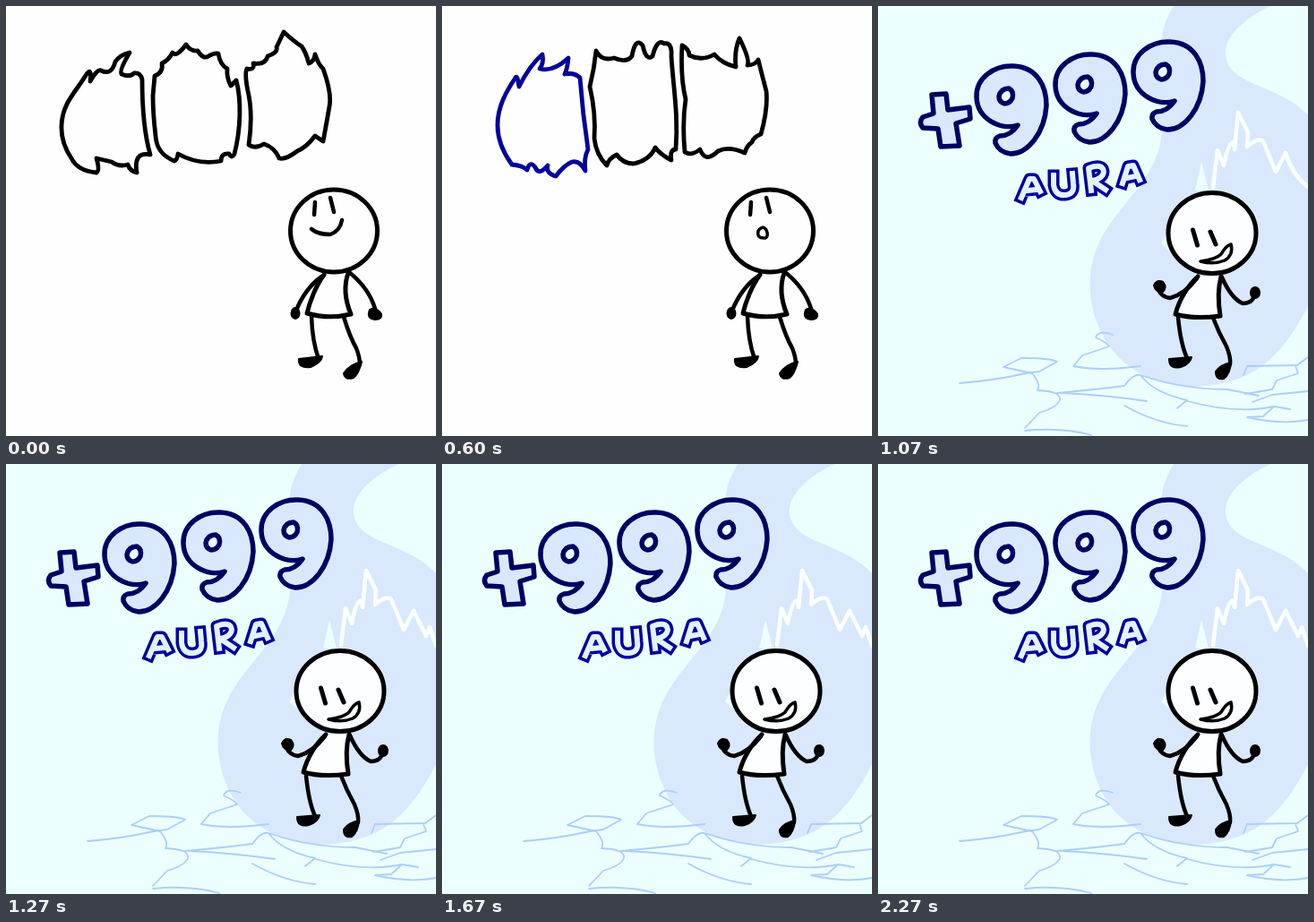
Recreate the animation shown at these times as an HTML page without scripts. Size 480 px wide and 480 px high, loop 2.34 s.

```html
<!DOCTYPE html>
<html lang="en">
<head>
<meta charset="utf-8">
<title>Plus 999 aura</title>
<style>
  html, body { margin: 0; width: 100%; height: 100%; overflow: hidden; background: #fefefe; }
  svg { display: block; width: 100vw; height: 100vh; stroke-linecap: round; stroke-linejoin: round; }

  /* Every scene is a hard cut on one shared 2340 ms loop. */
  .cut { opacity: 0; animation: 2340ms step-end infinite; }
  .intro { animation-name: intro; }
  .smile { animation-name: smile; }
  .gasp { animation-name: gasp; }
  .spin-a { animation-name: spin-a; }
  .spin-b { animation-name: spin-b; }
  .spin-c { animation-name: spin-c; }
  .stop-1 { animation-name: stop-1; }
  .stop-2 { animation-name: stop-2; }
  .stop-3 { animation-name: stop-3; }
  .flash { animation-name: flash; }
  .finale { animation-name: finale; }
  .bolt-a { animation-name: bolt-a; }
  .bolt-b { animation-name: bolt-b; }
  @keyframes intro { 0% { opacity: 1 } 34.187%, 100% { opacity: 0 } }
  @keyframes smile { 0% { opacity: 1 } 22.649%, 100% { opacity: 0 } }
  @keyframes gasp { 0% { opacity: 0 } 22.649%, 100% { opacity: 1 } }
  @keyframes spin-a { 0%, 8.547%, 17.094% { opacity: 1 } 2.991%, 11.538%, 20.085%, 100% { opacity: 0 } }
  @keyframes spin-b { 0%, 5.555%, 14.102%, 22.649%, 100% { opacity: 0 } 2.991%, 11.538%, 20.085% { opacity: 1 } }
  @keyframes spin-c { 0%, 8.547%, 17.094%, 22.649%, 100% { opacity: 0 } 5.555%, 14.102% { opacity: 1 } }
  @keyframes stop-1 { 0%, 28.632%, 100% { opacity: 0 } 22.649% { opacity: 1 } }
  @keyframes stop-2 { 0%, 31.196%, 100% { opacity: 0 } 28.632% { opacity: 1 } }
  @keyframes stop-3 { 0%, 34.187%, 100% { opacity: 0 } 31.196% { opacity: 1 } }
  @keyframes flash { 0%, 39.743%, 100% { opacity: 0 } 34.187% { opacity: 1 } }
  @keyframes finale { 0% { opacity: 0 } 39.743%, 100% { opacity: 1 } }
  @keyframes bolt-a { 0% { opacity: 1 } 48.29%, 100% { opacity: 0 } }
  @keyframes bolt-b { 0% { opacity: 0 } 48.29%, 100% { opacity: 1 } }

  .slots { fill: none; stroke: #000; stroke-width: 4.8; }
  .won { stroke: #00009c; }
  .figure { color: #000; --skin: none; --eye: #000; stroke: currentColor; stroke-width: 4.5; fill: none; }
  .figure.lit { --skin: #fdfeff; }
  .figure.dark { color: #000064; --eye: #fff; }
  .bold { stroke-width: 5; }
  .skin { fill: var(--skin); }
  .solid { fill: currentColor; stroke-width: 2; }
  .eye { stroke: var(--eye); }
  .score { stroke: #000064; stroke-width: 5.5; }
  .word { fill: none; stroke: #0000a0; stroke-width: 13; stroke-linecap: square; }
  .word .inner { stroke: #e4f2ff; stroke-width: 6; }
  .cracks { fill: none; stroke: #a9cffb; stroke-width: 1.8; }
  .bolt { fill: none; stroke: #fbffff; stroke-width: 4.5; }
</style>
</head>
<body>
<svg viewBox="0 0 480 480">
  <defs>
    <path id="left-a" d="M62,133C63,108 78,96 90,76Q96,68 94,84Q102,70 106,72Q118,78 122,62Q128,54 138,52Q126,72 129,76Q138,80 143,75Q150,74 152,82C152,115 155,145 161,166Q142,162 146,186Q138,184 136,177Q126,180 118,174L101,170Q105,184 101,186Q80,184 73,170Q61,152 62,133Z"/>
    <path id="mid-a" d="M164,100L166,78Q176,74 174,64Q181,61 186,52Q190,58 201,43Q206,51 214,50Q220,60 226,56Q232,52 237,53Q239,66 247,70Q246,80 251,89L257,83C263,105 262,138 255,165Q252,171 249,165Q240,164 240,173Q215,178 192,165Q191,172 188,173Q168,165 167,145Q164,120 164,100Z"/>
    <path id="right-a" d="M269,70Q278,72 276,64Q290,66 292,56Q304,52 302,46L310,29Q322,40 330,45Q335,52 338,64Q344,62 345,54Q349,66 354,70Q364,98 361,112Q358,130 354,151L345,145Q335,158 325,162Q312,172 305,170Q300,158 288,154Q278,160 271,155Q276,120 270,95Q266,75 269,70Z"/>
    <path id="left-b" d="M62,133C62,112 72,95 82,80Q84,76 86,90Q98,66 112,54Q114,64 109,70Q124,74 141,58Q140,70 137,76Q148,74 154,80Q157,120 163,160Q158,170 160,184Q154,172 145,174Q136,178 127,190Q115,186 118,178Q108,190 104,180Q98,172 95,183Q90,178 78,177Q62,155 62,133Z"/>
    <path id="mid-b" d="M165,90Q170,70 172,50Q178,62 192,58Q206,64 212,56Q216,34 224,44Q228,62 235,56Q240,36 248,42Q257,40 256,56C258,90 264,120 261,160Q254,160 256,172Q244,166 238,158Q232,172 214,176Q202,176 195,166Q186,170 184,178Q172,166 170,148Q172,120 165,90Z"/>
    <path id="right-b" d="M268,44Q276,48 276,55Q290,62 304,54Q312,64 328,68Q326,50 332,36Q344,60 341,66Q350,66 353,60Q358,80 362,95Q364,115 356,143Q348,146 346,152Q340,156 338,164Q320,156 308,162Q294,176 288,160Q278,168 271,163Q268,130 272,104Q266,80 268,44Z"/>
    <path id="left-c" d="M62,133C62,110 74,95 84,76Q92,82 98,66Q106,76 114,58Q122,70 130,66Q138,58 144,60Q143,74 153,80C153,115 157,140 162,165Q152,164 150,184Q140,172 132,178Q124,190 112,178Q104,176 98,187Q92,178 77,174Q62,152 62,133Z"/>
    <path id="mid-c" d="M165,95Q166,72 173,58Q182,66 189,50Q198,62 207,44Q215,58 224,48Q232,60 242,46Q244,62 255,70C261,100 263,135 258,165Q248,160 246,173Q234,164 224,177Q210,166 199,174Q188,164 182,175Q169,164 168,145Q168,120 165,95Z"/>
    <path id="right-c" d="M268,58Q278,64 282,56Q294,62 300,50Q308,54 318,34Q324,54 331,48Q334,66 347,56Q352,70 358,85Q364,112 355,147Q348,142 342,156Q332,152 322,163Q308,162 300,170Q290,156 282,162L272,158Q272,125 271,98Q266,78 268,58Z"/>

    <g id="standing">
      <ellipse class="bold" cx="366" cy="251" rx="48.500" ry="46"/>
      <path d="M345,219L344,233M362,214L366,230"/>
      <path class="bold" d="M355,300C346,312 339,330 336,343Q360,350 385,344C380,332 376,315 382,298"/>
      <path d="M354,301Q334,314 323,342M384,298Q405,315 412,338M341,347Q342,375 349,394M377,347Q384,370 391,382Q395,392 395,400"/>
      <ellipse class="solid" cx="323" cy="343" rx="4.5" ry="6"/>
      <path class="solid" d="M406,339Q413,335 419,344Q420,350 412,350Q402,349 406,339ZM327,394L353,391Q352,398 340,403Q326,405 327,394ZM377,410Q384,400 397,397Q394,410 388,415Q378,418 377,410Z"/>
    </g>
    <g id="head" class="bold">
      <ellipse class="skin" cx="373" cy="253.5" rx="49" ry="45"/>
      <path class="eye" d="M351.5,250L356.5,267M371,252L377,266"/>
    </g>
    <g id="body">
      <path class="skin bold" d="M357,302C346,312 336,328 332,344Q352,350 382,346Q378,320 383,302"/>
      <path d="M356,304Q342,322 326,326Q317,325 313,317M384,303Q394,326 407,332Q418,332 420,323M335,348Q338,378 345,393M374,348Q380,364 389,380Q394,392 393,400"/>
      <path class="solid" d="M308,312Q311,305 318,308Q323,314 318,319Q310,320 308,312ZM325,394L350,392Q348,400 338,403Q325,406 325,394ZM377,408Q383,400 394,398Q393,411 386,416Q377,418 377,408Z"/>
      <ellipse class="solid" cx="421" cy="320" rx="5" ry="6"/>
    </g>

    <path id="nine" d="M156,133C138,139 111,127 110,102C109,80 130,66 151,67C178,68 188,90 188,111C186,142 167,165 148,165C140,164 134,160 131,153Q130,147 136,145Q148,145 156,133Z"/>
    <path id="hole" d="M135,101Q137,92 146,92Q152,95 150,103Q147,109 141,109Q135,107 135,101Z"/>
    <g id="nines"><use href="#nine"/><use href="#nine" x="88" y="-13"/><use href="#nine" x="175" y="-27"/></g>
    <g id="holes"><use href="#hole"/><use href="#hole" x="88" y="-13"/><use href="#hole" x="175" y="-27"/></g>
    <path id="plus" d="M60,99L76,98L78,116L102,113L103,126L87,131L91,156L70,157L67,137L50,136Q45,130 50,124L62,120Z"/>
    <path id="letters" d="M160,214L169,193L174,193L181,207M167,206L177,205M196,189V200Q198,212 209,211Q220,210 218,198L217,187M238,206L235,181Q251,175 252,185Q251,193 239,195L254,205M273,198L279,179L285,178L292,194M278,192L288,190"/>
  </defs>

  <g class="cut intro">
    <rect width="480" height="480" fill="#fefefe"/>
    <g class="slots">
      <g class="cut spin-a"><use href="#left-a"/><use href="#mid-a"/><use href="#right-a"/></g>
      <g class="cut spin-b"><use href="#left-c"/><use href="#mid-c"/><use href="#right-c"/></g>
      <g class="cut spin-c"><use href="#left-b"/><use href="#mid-b"/><use href="#right-b"/></g>
      <g class="cut stop-1"><use class="won" href="#left-b"/><use href="#mid-b"/><use href="#right-b"/></g>
      <g class="cut stop-2"><use class="won" href="#left-c"/><use class="won" href="#mid-c"/><use href="#right-c"/></g>
      <g class="cut stop-3"><use class="won" href="#left-a"/><use class="won" href="#mid-a"/><use class="won" href="#right-a"/></g>
    </g>
    <g class="figure">
      <use href="#standing"/>
      <path class="cut smile" d="M341,249Q348,255 362,255Q373,251 375,239"/>
      <path class="cut gasp" d="M353,251Q358,244 362,250Q365,257 361,259Q351,260 353,251Z" stroke-width="3.5"/>
    </g>
  </g>

  <g class="cut flash">
    <rect width="480" height="480"/>
    <g class="score" fill="#000064"><use href="#plus"/><use href="#nines"/></g>
    <use href="#holes"/>
    <g class="figure dark">
      <use href="#body"/>
      <use href="#head" x="1" y="3.5"/>
      <path d="M361,288Q386,292 391,278" stroke-width="3"/>
    </g>
  </g>

  <g class="cut finale">
    <rect width="480" height="480" fill="#edfeff"/>
    <path fill="#dae8fd" d="M330,0C312,30 316,45 322,65C328,100 318,115 317,140C314,192 267,221 247,264C228,302 236,352 262,385C285,412 320,426 355,425C410,422 446,402 480,335V122C452,92 410,90 394,70C376,45 400,18 438,0Z"/>
    <path fill="#edfeff" d="M316,265L327,246L330,278ZM354,206L361,174L369,206Z"/>
    <g class="bolt">
      <path d="M374,202L379,161L386,178Q391,152 397,152L398,160L402,119L413,141L412,157Q424,146 430,151L444,185L455,164"/>
      <path class="cut bolt-a" d="M455,164Q462,188 480,202"/>
      <path class="cut bolt-b" d="M455,164L469,192L473,182L480,203"/>
    </g>
    <path class="cracks" d="M91,421Q130,418 165,410L180,408L200,397Q192,393 160,393L140,403L172,410Q182,422 178,429Q205,430 203,440Q200,448 180,454L164,471
      M164,474Q205,470 238,479M262,367Q246,361 243,370Q256,376 258,380L228,390L218,402Q246,408 293,402M200,432Q245,428 275,424Q285,410 293,412Q308,432 345,440L334,449
      M300,441Q250,434 205,432M293,412Q340,428 390,428L425,435M345,441Q400,456 442,447L460,450M480,392L468,401L412,402L408,412
      M466,402L469,410L445,418L440,428L410,433M480,430L440,434L418,442M442,447L430,458L412,459Q450,468 480,462M275,446Q310,466 345,469"/>
    <g class="score" fill="#dae8fd"><use href="#plus"/><use href="#nines"/><use href="#holes" fill="#edfeff"/></g>
    <g class="word"><use href="#letters"/><use class="inner" href="#letters"/></g>
    <g class="figure lit">
      <use href="#body"/>
      <use href="#head"/>
      <path d="M360,285Q377,283 383,277Q389,267 394,266Q397,278 387,284Q375,289 360,285Z" fill="#fdfeff" stroke-width="3.5"/>
    </g>
  </g>
</svg>
</body>
</html>
```
